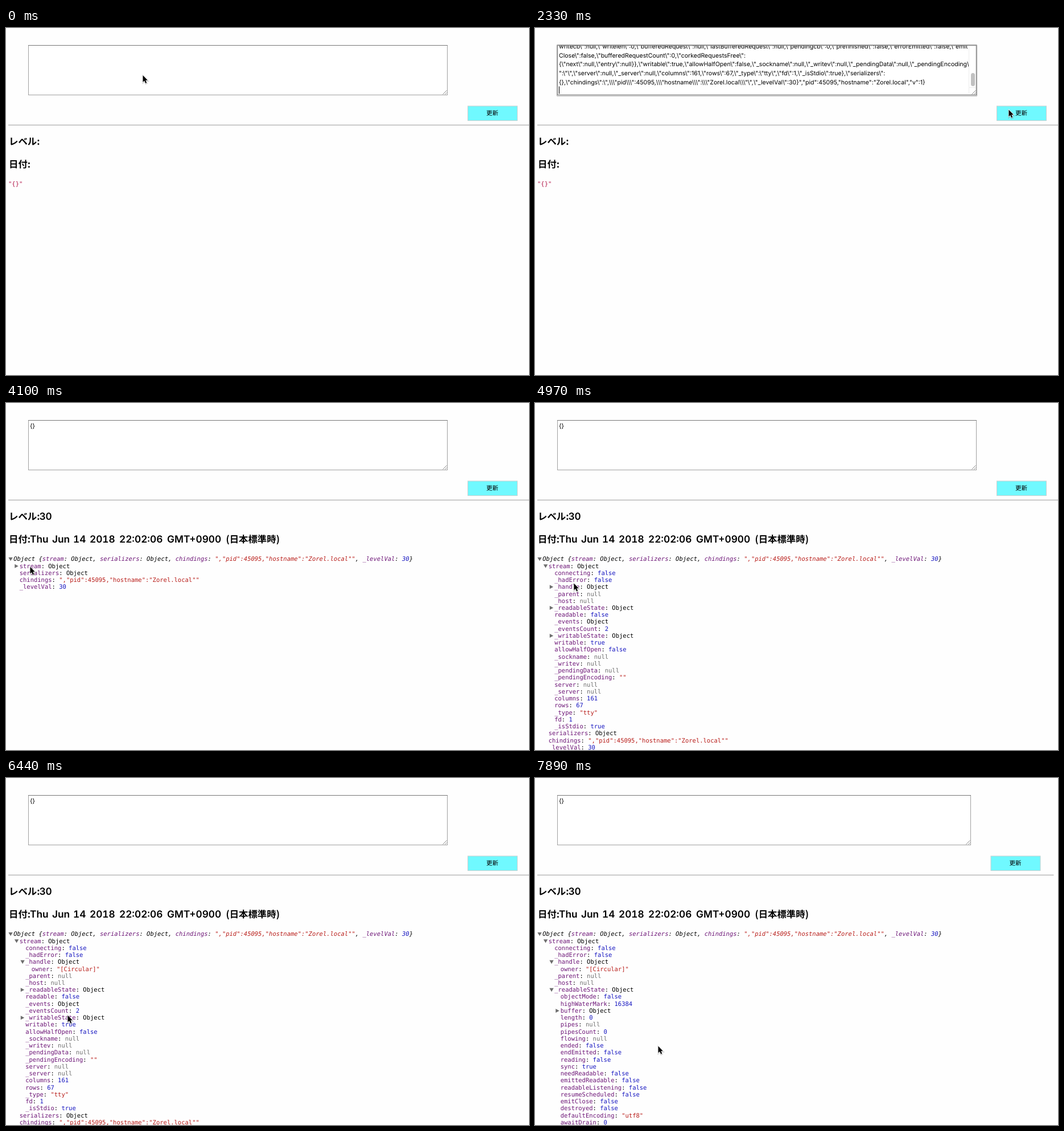
Recreate the animation shown at these times as an HTML page. Size 919 by 609 pixels, loop 8000 ms.

```html
<!DOCTYPE html>
<html lang="ja">
<head>
<meta charset="utf-8">
<style>
  html, body { margin: 0; width: 100%; height: 100%; overflow: hidden; background: #fefefe; }
  svg { display: block; }
  text { white-space: pre; text-rendering: geometricPrecision; }
  .tree { font: 10.5px "DejaVu Sans Mono", monospace; }
  .preview { font-style: italic; }
  .head { font: 700 16.4px "Noto Sans CJK JP", "Noto Sans CJK", sans-serif; }
  .latin { font: 600 17.3px Inter, sans-serif; font-feature-settings: "tnum"; }
  .input { font: 10.57px Inter, sans-serif; }
  .btn { font: 10.5px "Noto Sans CJK JP", "Noto Sans CJK", sans-serif; }
  .key { fill: #6c1476; }
  .str { fill: #b81c18; }
  .num { fill: #1414c0; }
  .nil { fill: #707070; }
</style>
</head>
<body>
<svg id="stage" width="919" height="609" viewBox="0 0 919 609"></svg>
<script>
const DURATION = 8000;
const stage = document.getElementById('stage');

const data = {
  stream: {
    connecting: false, _hadError: false,
    _handle: { owner: '[Circular]' },
    _parent: null, _host: null,
    _readableState: {
      objectMode: false, highWaterMark: 16384,
      buffer: { head: null, tail: null, length: 0 },
      length: 0, pipes: null, pipesCount: 0, flowing: null, ended: false,
      endEmitted: false, reading: false, sync: true, needReadable: false,
      emittedReadable: false, readableListening: false, resumeScheduled: false,
      emitClose: false, destroyed: false, defaultEncoding: 'utf8', awaitDrain: 0
    },
    readable: false, _events: {}, _eventsCount: 2,
    _writableState: {
      objectMode: false, highWaterMark: 16384, finalCalled: false, needDrain: false,
      ending: false, ended: false, finished: false, destroyed: false,
      decodeStrings: false, defaultEncoding: 'utf8', length: 0, writing: false,
      corked: 0, sync: false, bufferProcessing: false, writecb: null, writelen: 0
    },
    writable: true, allowHalfOpen: false, _sockname: null, _writev: null,
    _pendingData: null, _pendingEncoding: '', server: null, _server: null,
    columns: 161, rows: 67, _type: 'tty', fd: 1, _isStdio: true
  },
  serializers: {},
  chindings: ',"pid":45095,"hostname":"Zorel.local"',
  _levelVal: 30
};

const pasted = [
  String.raw`writecb\":null,\"writelen\":0,\"bufferedRequest\":null,\"lastBufferedRequest\":null,\"pendingcb\":0,\"prefinished\":false,\"errorEmitted\":false,\"emit`,
  String.raw`Close\":false,\"bufferedRequestCount\":0,\"corkedRequestsFree\":`,
  String.raw`{\"next\":null,\"entry\":null}},\"writable\":true,\"allowHalfOpen\":false,\"_sockname\":null,\"_writev\":null,\"_pendingData\":null,\"_pendingEncoding` + '\\',
  String.raw`":\"\",\"server\":null,\"_server\":null,\"columns\":161,\"rows\":67,\"_type\":\"tty\",\"fd\":1,\"_isStdio\":true},\"serializers\":`,
  String.raw`{},\"chindings\":\",\\\"pid\\\":45095,\\\"hostname\\\":\\\"Zorel.local\\\"\",\"_levelVal\":30}","pid":45095,"hostname":"Zorel.local","v":1}`
];

// Pointer moves: start, end, steps, x, y
const moves = [
  [60, 60, 1, 220, 73], [210, 410, 4, 184, 67], [640, 870, 5, 136, 63],
  [1710, 2330, 11, 832, 143], [2510, 2510, 1, 829, 139], [2810, 2950, 3, 342, 195],
  [3130, 3620, 9, 38, 275], [3860, 3860, 1, 37, 278], [4100, 4100, 1, 42, 287],
  [4160, 4210, 2, 49, 292], [4390, 4550, 4, 42, 288], [4910, 5030, 3, 77, 326],
  [5270, 5550, 6, 60, 319], [5850, 6080, 5, 133, 395], [6260, 6260, 1, 130, 395],
  [6440, 6440, 1, 108, 416], [6790, 6790, 1, 86, 378], [6850, 6850, 1, 85, 375],
  [7090, 7200, 3, 84, 373], [7500, 7500, 1, 103, 386], [7650, 7890, 5, 216, 470]
];

const ease = p => p * p * (3 - 2 * p);
const within = (t, from, to = DURATION) => t >= from && t < to;
const text = (x, y, cls, body) => `<text x="${x}" y="${y}" class="${cls}">${body}</text>`;
const rect = (x, y, w, h, attrs) =>
  `<rect x="${x}" y="${y}" width="${w}" height="${h}" ${attrs}/>`;
const span = (cls, body) => `<tspan class="${cls}">${body}</tspan>`;
const isObject = v => v !== null && typeof v === 'object';

function pointer(t) {
  let x = 240, y = 82.5;
  for (const [start, end, steps, tx, ty] of moves) {
    if (t < start) break;
    const step = end > start ? Math.floor((t - start) / (end - start) * (steps - 1) + 1e-6) + 1 : steps;
    const p = ease(Math.min(step, steps) / steps);
    x += (tx - x) * p;
    y += (ty - y) * p;
  }
  return [x, y];
}

function drawPointer(t) {
  const [x, y] = pointer(t);
  const at = `transform="translate(${x.toFixed(1)} ${y.toFixed(1)})"`;
  if (within(t, 640, 2400) && x < 776 && y < 118) {
    return `<path ${at} d="M-2.5-6.5Q0-6.5 0-5Q0-6.5 2.5-6.5M0-5V5M-2.5 6.5Q0 6.5 0 5Q0 6.5 2.5 6.5M-1.5 1.5H1.5" fill="none" stroke="#222"/>`;
  }
  const arrow = 'M.5.5V12.4L3.2 9.9L5.2 14.4L7.2 13.5L5.3 9.2H8.9Z';
  return `<g ${at}><path d="${arrow}" transform="translate(.3 1)" fill="none" stroke="#000" stroke-opacity=".18" stroke-width="2.4"/>` +
    `<path d="${arrow}" stroke="#fff" stroke-width="1.4" paint-order="stroke"/></g>`;
}

function value(v) {
  if (v === null) return span('nil', 'null');
  if (isObject(v)) return 'Object';
  return typeof v === 'string' ? span('str', `"${v}"`) : span('num', v);
}

const pair = ([k, v]) => `${span('key', k)}: ${value(v)}`;

function drawTree(open) {
  let out = '', row = 0;
  const line = (depth, body, marker, cls = 'tree') => {
    const y = 277.3 + 12.24 * row++, x = 4.8 + 10.5 * depth, m = y - 3.4;
    if (y > 622) return;
    if (marker) {
      const shape = marker === 'open'
        ? `M${x - .4} ${m - 3}h7.4l-3.7 6.4z` : `M${x} ${m - 3.5}v7l6.4-3.5z`;
      out += `<path d="${shape}" fill="#6e6e6e"/>`;
    }
    out += text(13.2 + 10.5 * depth, y, cls, body);
  };
  const walk = (node, depth) => {
    for (const [k, v] of Object.entries(node)) {
      const isOpen = open.has(k);
      const marker = isObject(v) && Object.keys(v).length ? (isOpen ? 'open' : 'closed') : '';
      line(depth, pair([k, v]), marker);
      if (isOpen) walk(v, depth + 1);
    }
  };
  const preview = `Object {${Object.entries(data).map(pair).join(', ')}}`;
  line(0, preview, open.has('root') ? 'open' : 'closed', 'tree preview');
  if (open.has('root')) walk(data, 1);
  return out;
}

function openNodes(t) {
  const open = new Set();
  if (t >= 3740) open.add('root');
  if (t >= 4730) open.add('stream');
  if (t >= 5790) open.add('_handle');
  if (within(t, 6500, 6680)) open.add('_writableState');
  if (t >= 7380) open.add('_readableState');
  return open;
}

function drawInput(t, right) {
  const w = right - 39, focused = within(t, 810, 2390);
  let out = focused
    ? rect(38.5, 29.5, w + 1, 90, 'rx="1" fill="none" stroke="#c4c4c4" stroke-width="1.6"') +
      rect(39.5, 30.5, w - 1, 87, 'fill="#fff" stroke="#858585" stroke-width="1.4"')
    : rect(39.5, 30.5, w - 1, 87, 'fill="#fff" stroke="#a0a0a0"') +
      `<path d="M39 30.5H${right}" stroke="#777"/>`;
  if (within(t, 1410, 2400)) {
    const lines = pasted.map((s, i) => text(42, 35.8 + 15.75 * i, 'input', s)).join('');
    out += `<g clip-path="url(#inner)">${lines}</g>` +
      `<path d="M762.5 31V117M763 104.5H775" stroke="#ececec"/>` +
      rect(766, 79, 7, 23, 'rx="3.5" fill="#c1c1c1"');
    if (focused) out += rect(42, 102.5, 1, 13, '');
  } else if (focused) {
    out += rect(42, 34.5, 1, 13, '');
  } else if (t >= 2400) {
    out += text(42, 44.2, 'input', '{}');
  }
  return out + `<path d="M${right - 8.5} 116.5l7-7M${right - 4.5} 116.5l3-3" stroke="#888" fill="none"/>`;
}

function drawButton(t, x) {
  const ring = within(t, 2390, 3680)
    ? rect(x - 1.5, 135, 91, 30, 'rx="2" fill="none" stroke="#bcbcc4" stroke-width="3"') : '';
  return ring + rect(x + .5, 137, 87, 25.5, 'fill="#70f9ff" stroke="#c6d0d0"') +
    text(x + 33, 153.2, 'btn', '更新');
}

function drawHeadings(done) {
  let out = text(5, 204.5, 'head', 'レベル:') + text(5, 245, 'head', '日付:');
  if (!done) return out;
  const words = [['Thu', 42], ['Jun', 81], ['14', 118], ['2018', 147], ['22:02:06', 199], ['GMT+0900', 283]];
  out += text(58.4, 204.5, 'latin', '30');
  for (const [word, x] of words) out += text(x, 245, 'latin', word);
  return out + text(386.5, 245, 'head', '(日本標準時)');
}

function scene(t) {
  const done = t >= 2400;
  const narrow = within(t, 6500, 6680) || t >= 7380;
  const shift = narrow ? 10.5 : 0;
  return '<clipPath id="inner"><rect x="40" y="31" width="722" height="86"/></clipPath>' +
    drawInput(t, narrow ? 766 : 776) +
    drawButton(t, 811 - shift) +
    `<path d="M4 170.3H${narrow ? 911.5 : 919}" stroke="#999"/>` +
    drawHeadings(done) +
    (done ? drawTree(openNodes(t)) : text(4, 277.3, 'tree', '<tspan fill="#b3184a">"{}"</tspan>')) +
    drawPointer(t);
}

let last = '';
function frame(now) {
  const next = scene(now % DURATION);
  if (next !== last) stage.innerHTML = last = next;
  requestAnimationFrame(frame);
}
frame(0);
</script>
</body>
</html>
```
